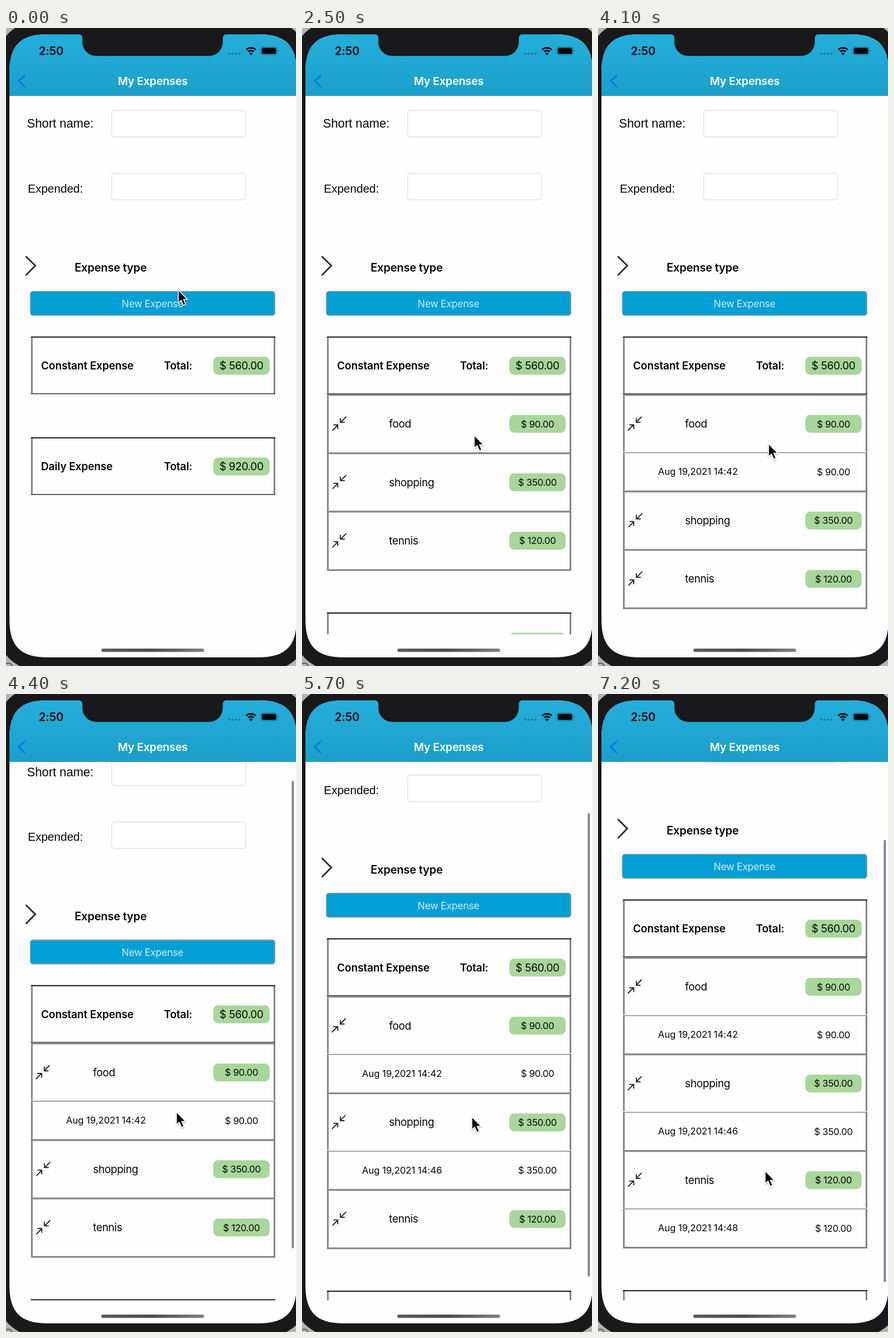
Write an HTML page that moves like this. It is 505x1108 px and loops after 7400 ms.

```html
<!DOCTYPE html>
<html lang="en">
<head>
<meta charset="utf-8">
<title>Expenses</title>
<style>
  html, body { margin: 0; width: 100%; height: 100%; overflow: hidden; background: #b4b4b7; }
  svg { display: block; }
  text { font-family: Inter, Roboto, sans-serif; font-size: 18.6px; letter-spacing: -.02em; fill: #060607; }
  .bold { font-weight: 600; letter-spacing: -.008em; }
  .small { font-size: 16.4px; }
  .date { letter-spacing: -.007em; }
  .mid { text-anchor: middle; }
  .label { font-family: "Liberation Sans", Arial, sans-serif; letter-spacing: 0; }
  .line { fill: none; stroke: #87878a; stroke-width: 3; }
  .input { fill: #fff; stroke: #e2e2e9; stroke-width: 1.3; }
</style>
</head>
<body>
<svg id="stage" width="505" height="1108" viewBox="0 0 505 1108"></svg>
<script>
const LOOP = 7400, STEP = 100;
const PAPER = '#fefdff', BEZEL = '#19181a';
const ROW_H = 101.4, DETAIL_H = 66.4, ROWS_TOP = 637;

const rows = [
  { name: 'food', sum: '$ 90.00', date: 'Aug 19,2021 14:42', opensAt: 3500 },
  { name: 'shopping', sum: '$ 350.00', date: 'Aug 19,2021 14:46', opensAt: 5150 },
  { name: 'tennis', sum: '$ 120.00', date: 'Aug 19,2021 14:48', opensAt: 6650 }
];
const PANEL_OPENS = 1210, OPEN_MS = 500;

// time, x, y of the pointer tip
const pointerKeys = [
  [0, 300, 455], [750, 327, 605], [1700, 327, 605], [2300, 300, 707], [2480, 300, 707],
  [2700, 297, 722], [4150, 297, 722], [4900, 296, 736], [5650, 296, 736],
  [5950, 292, 712], [6150, 292, 712], [6600, 291, 828]
];
const scrollKeys = [[4110, 0], [4900, 99], [5600, 99], [6000, 179]];
const barKeys = [[5600, 812], [6000, 768]];

const text = (x, y, str, cls = '', extra = '') => `<text x="${x}" y="${y}" class="${cls}" ${extra}>${str}</text>`;
const pill = (y, sum, cls = '') =>
  `<rect x="361" y="${y - 15.5}" width="98" height="31" rx="8.5" fill="#a9d69a"/>` +
  text(410, y + (cls ? 6 : 6.5), sum, 'mid ' + cls);

const card = (id, y, title, sum) => `<g id="${id}">
  <rect x="44" y="${y}" width="424.5" height="100" fill="${PAPER}"/>
  <path class="line" d="M45 ${y}v100M467.5 ${y}v100"/>
  <path d="M43.5 ${y + .8}h425.5" stroke="#171718" stroke-width="2"/>
  <path d="M43.5 ${y + 99.3}h425.5" stroke="#333335" stroke-width="1.5"/>
  ${text(61, y + 57, title, 'bold')}${text(275, y + 57, 'Total:', 'bold')}${pill(y + 50.5, sum)}</g>`;

const arrows = `<path fill="none" stroke="#29292b" stroke-width="1.9"
  d="M-11.5 12L-2.5 3M-9.5 2.3H-2.3V9.7M12.5-12L3-2.5M2.3-9.5V-2.3H10"/>`;

const rowMarkup = (row, i) => `<g id="row${i}">
  <rect class="line" x="45" y=".2" width="422.5" height="${ROW_H}" style="fill:${PAPER}"/>
  <g id="icon${i}">${arrows}</g>
  ${text(151.5, 57.2, row.name)}${pill(50.6, row.sum, 'small')}</g>`;

const detailMarkup = (row, i) => `<g id="detail${i}">
  <rect x="43.5" y="-2.5" width="425.5" height="${DETAIL_H + 2.5}" fill="${PAPER}"/>
  <path class="line" d="M45-1V${DETAIL_H + .2}H467.5V-1"/>
  <path d="M43.5-.8H469" stroke="#88888b" stroke-width="1.5"/>
  ${text(104.5, 38, row.date, 'small date')}${text(410, 38.5, row.sum, 'small mid')}</g>`;

document.getElementById('stage').innerHTML = `
<defs>
  <linearGradient id="sky" x2="0" y2="1"><stop stop-color="#25aedb"/><stop offset="1" stop-color="#1b9fc9"/></linearGradient>
  <linearGradient id="home"><stop stop-color="#5a5a5c"/><stop offset=".5" stop-color="#4c4c4e"/><stop offset="1" stop-color="#808082"/></linearGradient>
  <clipPath id="screen">
    <path d="M6 77c0-46.7 19.3-66 66-66h368c46.7 0 66 19.3 66 66v950c0 46.7-19.3 66-66 66h-368c-46.7 0-66-19.3-66-66z"/>
  </clipPath>
  <clipPath id="view"><rect x="6" y="118" width="500" height="935"/></clipPath>
  <filter id="shade" x="-50%" y="-50%" width="200%" height="200%"><feDropShadow dx="0" dy="1.5" stdDeviation="1.2" flood-opacity=".35"/></filter>
</defs>
<rect width="505" height="1108" fill="#b4b4b7"/>
<circle cx="4" cy="1110" r="7" fill="none" stroke="#444" stroke-width="1.6"/>
<rect x="-18" y="-14" width="548" height="1131" rx="78" fill="${BEZEL}"/>
<g clip-path="url(#screen)">
  <rect x="6" y="11" width="500" height="1082" fill="${PAPER}"/>
  <g clip-path="url(#view)">
    <g id="content">
      ${text(36.5, 173, 'Short name:', 'label', 'style="font-size:21.3px"')}
      ${text(38, 285.5, 'Expended:', 'label', 'style="font-size:20.1px"')}
      <rect class="input" x="184" y="143" width="233.5" height="46" rx="5"/>
      <rect class="input" x="184" y="252.5" width="233.5" height="46" rx="5"/>
      <path d="M34.5 396.5L51 412.7 34.5 429.5" fill="none" stroke="#2b2b2d" stroke-width="2.8"/>
      ${text(119.5, 423, 'Expense type', 'bold', 'style="font-size:19.4px"')}
      <rect x="42.5" y="457.5" width="425.5" height="41.5" rx="4.5" fill="#029fd5" stroke="#83949b" stroke-width="1.6"/>
      ${text(255, 485, 'New Expense', 'mid', 'style="font-size:17.2px;fill:#cdebf6"')}
      ${card('constant', 536, 'Constant Expense', '$ 560.00')}
      ${card('daily', 711, 'Daily Expense', '$ 920.00')}
      <g id="panel">${rows.map((r, i) => rowMarkup(r, i) + detailMarkup(r, i)).join('')}</g>
    </g>
    <rect id="bar" x="497.5" width="4" rx="2" fill="#8b8b8d"/>
  </g>
  <rect x="6" y="11" width="500" height="107" fill="url(#sky)"/>
  <path d="M33 82L22 92 33 102.5" fill="none" stroke="#0a74ee" stroke-width="2.5"/>
  ${text(255.5, 99, 'My Expenses', 'bold mid', 'style="font-size:19.1px;fill:#fff"')}
  ${text(57, 47, '2:50', 'bold', 'style="font-size:19.7px"')}
  <g fill="#1b7c9c">${[0, 1, 2, 3].map(i => `<circle cx="${388.5 + i * 6}" cy="44.5" r="2"/>`).join('')}</g>
  <path d="M418.2 37.8a11.7 11.7 0 0 1 16.6 0M421.5 41.2a7 7 0 0 1 10 0" fill="none" stroke="#050506" stroke-width="2.7"/>
  <path d="M426.5 47.3l-3.1-3.3a4.3 4.3 0 0 1 6.2 0z" fill="#050506"/>
  <rect x="444" y="33" width="28" height="13.5" rx="4" fill="none" stroke="#126a88" stroke-width="1.2"/>
  <rect x="445.7" y="34.6" width="24.6" height="10.3" rx="2.5" fill="#050506"/>
  <path d="M473.8 37.5q2.4 2.2 0 4.6z" fill="#126a88"/>
  <rect x="166" y="1077.8" width="179" height="5.6" rx="2.8" fill="url(#home)"/>
</g>
<path d="M126 10.5a7 7 0 0 1 7 7v7a24 24 0 0 0 24 24h196.500a24 24 0 0 0 24-24v-7a7 7 0 0 1 7-7z" fill="${BEZEL}"/>
<path id="pointer" d="M0 0V22.500L5 18 9 27 13 25.200 9.200 16.500H16.200Z" fill="#060607" stroke="#fff" stroke-width="1.500" filter="url(#shade)"/>`;

const el = id => document.getElementById(id);
const clamp = v => Math.min(1, Math.max(0, v));
const bezier = (a, b, u) => 3 * a * u * (1 - u) ** 2 + 3 * b * u * u * (1 - u) + u ** 3;

// cubic-bezier(.25, .1, .25, 1)
function ease(t) {
  let lo = 0, hi = 1;
  for (let i = 0; i < 24; i++) {
    const u = (lo + hi) / 2;
    if (bezier(.25, .25, u) < t) lo = u; else hi = u;
  }
  return bezier(.1, 1, (lo + hi) / 2);
}
const cubicInOut = t => t < .5 ? 4 * t ** 3 : 1 - 4 * (1 - t) ** 3;
const smooth = t => t * t * (3 - 2 * t);

function track(keys, t, k = 1) {
  if (t <= keys[0][0]) return keys[0][k];
  const i = keys.findIndex(key => key[0] >= t);
  if (i < 0) return keys[keys.length - 1][k];
  const a = keys[i - 1], b = keys[i];
  return a[k] + (b[k] - a[k]) * smooth((t - a[0]) / (b[0] - a[0]));
}

const move = (id, x, y, more = '') => el(id).setAttribute('transform', `translate(${x} ${y})${more}`);
const fade = (id, v) => el(id).setAttribute('opacity', v);

function render(t) {
  let y = ROWS_TOP;
  rows.forEach((row, i) => {
    const part = clamp((t - row.opensAt) / OPEN_MS), open = ease(part);
    move('row' + i, 0, y);
    move('icon' + i, 64.5, 50, ` rotate(${180 * cubicInOut(part)})`);
    y += ROW_H;
    move('detail' + i, 0, y - (1 - open) * DETAIL_H / 2);
    fade('detail' + i, part);
    y += open * DETAIL_H;
  });

  const part = clamp((t - PANEL_OPENS) / OPEN_MS), open = ease(part);
  const height = y - ROWS_TOP;
  move('panel', 0, -(1 - open) * height / 2);
  fade('panel', part);
  move('daily', 0, open * height);

  const scroll = track(scrollKeys, t);
  move('content', 0, -scroll);
  el('bar').setAttribute('y', 130 + scroll * .688);
  el('bar').setAttribute('height', track(barKeys, t));
  fade('bar', clamp((t - 4110) / 150));
  move('pointer', track(pointerKeys, t, 1), track(pointerKeys, t, 2));
}

const start = performance.now();
function tick() {
  const t = (performance.now() - start) % LOOP;
  render(Math.min(Math.floor(t / STEP) * STEP, LOOP - 2 * STEP));
  requestAnimationFrame(tick);
}
tick();
</script>
</body>
</html>
```
